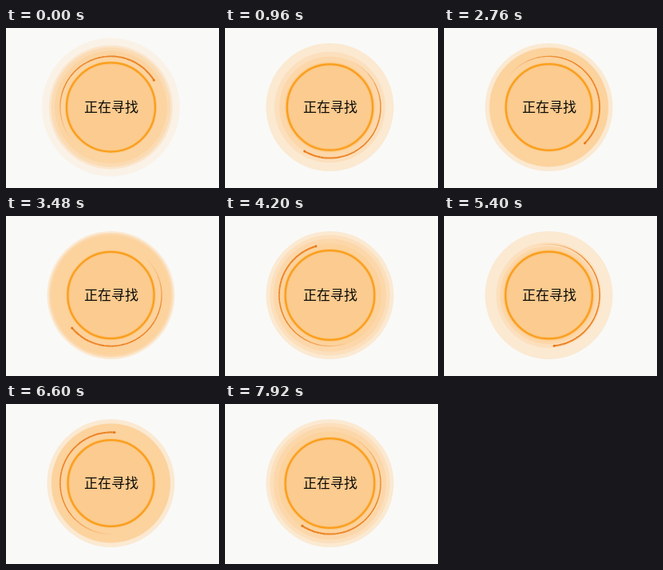
An HTML page with a canvas that plays this animation: 267x200 px, repeating every 8 s.

```html
<!DOCTYPE html>
<html lang="zh-CN">
<head>
<meta charset="utf-8">
<title>正在寻找</title>
<style>
html, body { margin: 0; width: 100%; height: 100%; overflow: hidden; background: #f9f9f7; }
canvas { display: block; }
</style>
</head>
<body>
<canvas id="stage" width="267" height="200"></canvas>
<script>
const ctx = document.getElementById('stage').getContext('2d');
const TAU = Math.PI * 2;
const CX = 131.5, CY = 99;
const LOOP = 8000, STEP = 120, PAUSE_STEP = 24;
const BREATH = 31;              // steps per breath of the halo; the ring pulses twice as fast
const SWEEP_RADIUS = 63.6, SWEEP_LENGTH = 190, SWEEP_START = 58, SWEEP_SPEED = 19;

const radians = degrees => degrees * Math.PI / 180;
const wave = (step, peak, period) => Math.cos(TAU * (step - peak) / period);

function disc(radius, alpha, x = CX, y = CY, color = '251,203,143') {
  ctx.fillStyle = `rgba(${color},${alpha})`;
  ctx.beginPath();
  ctx.arc(x, y, radius, 0, TAU);
  ctx.fill();
}

function strokeArc(radius, start, end, width, color) {
  ctx.strokeStyle = color;
  ctx.lineWidth = width;
  ctx.beginPath();
  ctx.arc(CX, CY, radius, start, end);
  ctx.stroke();
}

function drawHalo(step) {
  const swell = Math.max(0, wave(step % BREATH, 18, 20));
  disc(80 + 8 * swell, .36 - .26 * swell);
  // Inner layers swing wider and lead the outer ones.
  for (let i = 0; i < 3; i++) {
    const radius = 72 - 3 * i + (6 + 2 * i) * wave(step, 29 - 1.75 * i, BREATH);
    disc(radius, .32 + .08 * i);
  }
}

function drawRing(step) {
  const radius = 54.7 + 1.3 * wave(step, 2, BREATH / 2);
  disc(radius, 1);
  strokeArc(radius, 0, TAU, 4, 'rgba(251,165,45,.3)');
  strokeArc(radius, 0, TAU, 2.2, '#fa9e1c');
}

function drawSweep(step) {
  const head = radians(SWEEP_START + SWEEP_SPEED * step - 90);
  const length = radians(SWEEP_LENGTH);
  const count = 80;
  for (let i = 0; i < count; i++) {
    const u = i / count;
    const start = head - length * (1 - u);
    strokeArc(SWEEP_RADIUS, start, start + length / count, .8 + 1.4 * u,
      `rgba(235,128,32,${Math.min(1, u * 3)})`);
  }
  disc(1.5, 1, CX + SWEEP_RADIUS * Math.cos(head), CY + SWEEP_RADIUS * Math.sin(head), '232,118,20');
}

function draw(elapsed) {
  let step = Math.floor(elapsed % LOOP / STEP);
  if (step >= PAUSE_STEP) step--;

  ctx.fillStyle = '#f9f9f7';
  ctx.fillRect(0, 0, 267, 200);
  drawHalo(step);
  drawRing(step);
  drawSweep(step);

  ctx.fillStyle = '#0a0806';
  ctx.font = '17px "Noto Sans CJK SC", "Noto Sans CJK", sans-serif';
  ctx.textAlign = 'center';
  ctx.fillText('正在寻找', 132, 105);
}

const origin = performance.now();
function tick() {
  draw(performance.now() - origin);
  requestAnimationFrame(tick);
}
tick();
</script>
</body>
</html>
```
